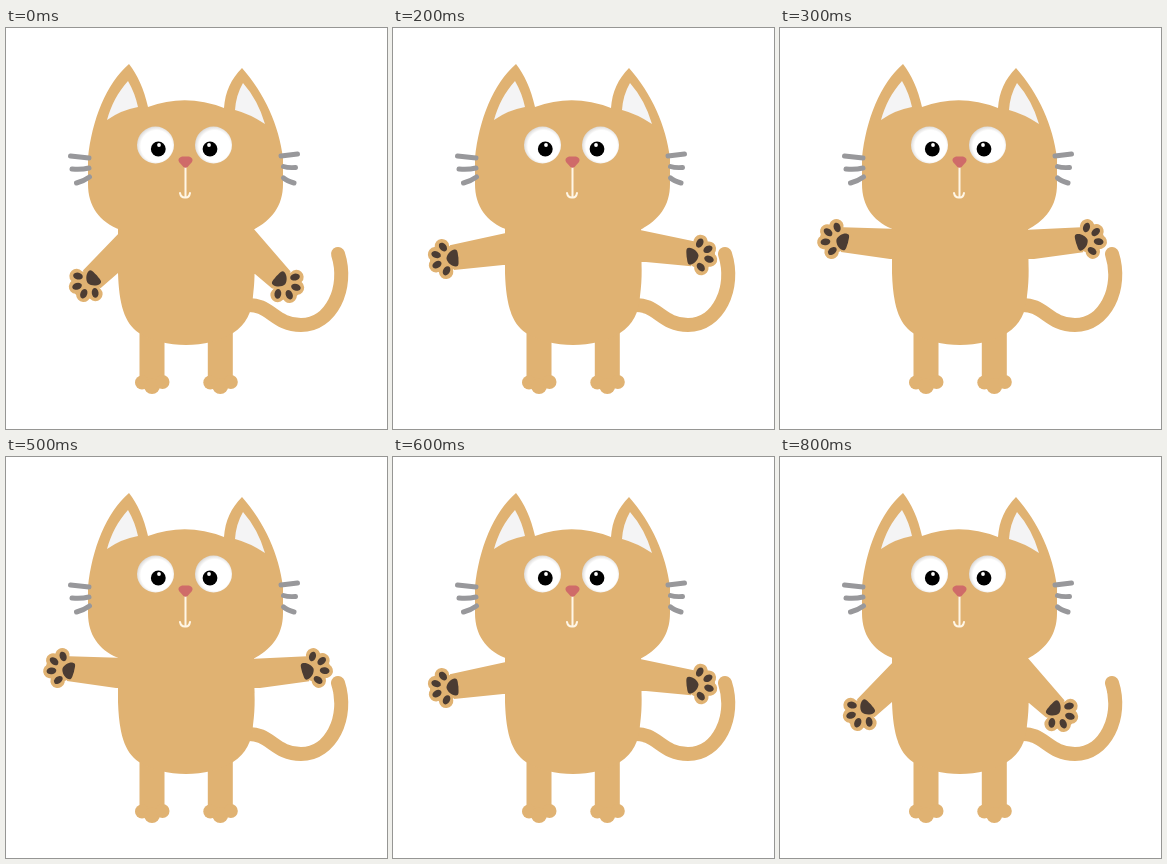
An HTML page that plays this animation: 381 by 401 pixels, repeating every 900 ms.

```html
<!DOCTYPE html>
<html lang="en">
<head>
<meta charset="utf-8">
<title>Waving cat</title>
<style>
  html, body { margin: 0; width: 100%; height: 100%; overflow: hidden; background: #fff; }
  svg { display: block; width: 100vw; height: 100vh; }
  .fur { fill: #e0b272; }
  .pad { fill: #4b3c33; }
  .line { fill: none; stroke-linecap: round; stroke-linejoin: round; }
</style>
</head>
<body>
<svg viewBox="0 0 381 401">
  <defs>
    <radialGradient id="eyeball" cx=".53" cy=".53" r=".53">
      <stop offset=".8" stop-color="#fff"/>
      <stop offset="1" stop-color="#dedcda"/>
    </radialGradient>
    <g id="paw">
      <g class="fur">
        <circle r="14"/>
        <circle cx="-1" cy="-13" r="7.2"/>
        <circle cx="-8.5" cy="-5.5" r="7.2"/>
        <circle cx="-8.5" cy="5.5" r="7.2"/>
        <circle cx="1" cy="13" r="7.2"/>
      </g>
      <g class="pad">
        <path d="M2.5 0C3-4 7-8 11-8.5C15-9 14-4 14.5 0C14 4 15 9 11 8.5C7 8 3 4 2.5 0Z"/>
        <ellipse rx="4.9" ry="3.4" transform="translate(0 -12) rotate(55)"/>
        <ellipse rx="4.9" ry="3.4" transform="translate(-7.5 -5) rotate(25)"/>
        <ellipse rx="4.9" ry="3.4" transform="translate(-7.5 5) rotate(-25)"/>
        <ellipse rx="4.9" ry="3.4" transform="translate(1.5 12) rotate(-55)"/>
      </g>
    </g>
    <g id="leg" class="fur">
      <path d="M133.5 290H158.5V354H133.5Z"/>
      <circle cx="136" cy="354.500" r="7"/>
      <circle cx="146" cy="358" r="8"/>
      <circle cx="156.500" cy="354" r="7"/>
    </g>
    <g id="eye">
      <circle r="18.500" fill="url(#eyeball)"/>
    </g>
    <g id="pupil">
      <circle r="7.400"/>
    </g>
  </defs>

  <path class="line" stroke="#e0b272" stroke-width="14"
    d="M240 277C264 275 268 297 295 297C325 297 343 260 332 226"/>
  <use href="#leg"/>
  <use href="#leg" x="68.300"/>

  <path class="fur" d="M112 195V245C113 275 118 295 133 305C158 321 202 321 227 305C240 297 246 284 247 268C250 245 248 235 248 195Z"/>

  <g id="arms">
    <path class="fur"/><use href="#paw"/>
    <path class="fur"/><use href="#paw"/>
  </g>

  <path class="fur" d="M123 36C131 46 138 61 142 79Q180 65 218 80C219 64 225 51 236 40C259 66 273 98 277 130V156C277 178 266 192 247 202H115C93 194 82 178 82 156V130C86 92 100 56 123 36Z"/>
  <path fill="#f4f4f5" d="M122 53C112 64 105 77 101 92Q115 82 132 79Q129 65 122 53Z"/>
  <path fill="#f4f4f5" d="M237 55Q230 67 229 82Q244 86 259 96Q252 72 237 55Z"/>

  <use href="#eye" x="149.500" y="117"/>
  <use href="#eye" x="207.500" y="117"/>
  <use href="#pupil" x="152.300" y="121"/>
  <use href="#pupil" x="204" y="121"/>
  <g fill="#fff">
    <circle cx="153" cy="117" r="1.900"/>
    <circle cx="203" cy="117" r="1.900"/>
  </g>

  <path class="line" stroke="#fff6e6" stroke-width="2" d="M179.500 139V169M174 165Q175 170 179.500 169.500Q183 170 184 165"/>
  <path fill="#cf6b69" d="M176 128.500H183Q188 130 186 134L182 138.500Q179.500 141 177 138.500L173 134Q171 130 176 128.500Z"/>

  <path class="line" stroke="#98989b" stroke-width="5"
    d="M64.500 128L83 130M66 141Q75 142 83 140M70.500 155Q78 153 83.500 149M291.500 126L275 128M289.500 139.500Q282 140 277.500 138.500M288 155Q281 153 277.500 150"/>
</svg>
<script>
  const STEP = 100;
  const ORDER = [0, 1, 2, 3, 4, 3, 2, 1, 0];

  // Each pose: paw x, y, tilt; shoulder top x, y; shoulder bottom x, y
  const LEFT = [
    [80, 257, -42, 116, 202, 112, 245],
    [63, 247, -25, 113, 203, 111, 241],
    [51, 231, -5, 113, 205, 110, 237],
    [54, 211, 15, 120, 201, 110, 231],
    [61, 190, 31, 104, 194, 110, 225]
  ];
  const RIGHT = [
    [281, 258, -42, 247, 200, 249, 246],
    [297, 246, -22, 247, 202, 251, 240],
    [308, 227, 6, 247, 202, 253, 234],
    [310, 211, 17, 243, 202, 254, 231],
    [301, 188, 30, 260, 192, 254, 222]
  ];

  const [leftArm, leftPaw, rightArm, rightPaw] = document.getElementById('arms').children;

  function setArm(arm, paw, pose, side) {
    const [x, y, tilt, topX, topY, lowX, lowY] = pose;
    const dx = (topX + lowX) / 2 - x;
    const dy = (topY + lowY) / 2 - y;
    const length = Math.hypot(dx, dy);
    const ux = dx / length, uy = dy / length;
    const half = 12.5 * side;
    const wristX = x + ux * 8, wristY = y + uy * 8;
    arm.setAttribute('d',
      `M180 ${topY}L${topX} ${topY}L${wristX + uy * half} ${wristY - ux * half}` +
      `L${wristX - uy * half} ${wristY + ux * half}L${lowX} ${lowY}H180Z`);
    paw.setAttribute('transform', `translate(${x} ${y}) scale(${side} 1) rotate(${tilt})`);
  }

  function draw(now) {
    const pose = ORDER[Math.floor(now / STEP) % ORDER.length];
    setArm(leftArm, leftPaw, LEFT[pose], 1);
    setArm(rightArm, rightPaw, RIGHT[pose], -1);
  }

  let start;
  function tick(now) {
    start ??= now;
    draw(now - start);
    requestAnimationFrame(tick);
  }
  draw(0);
  requestAnimationFrame(tick);
</script>
</body>
</html>
```
